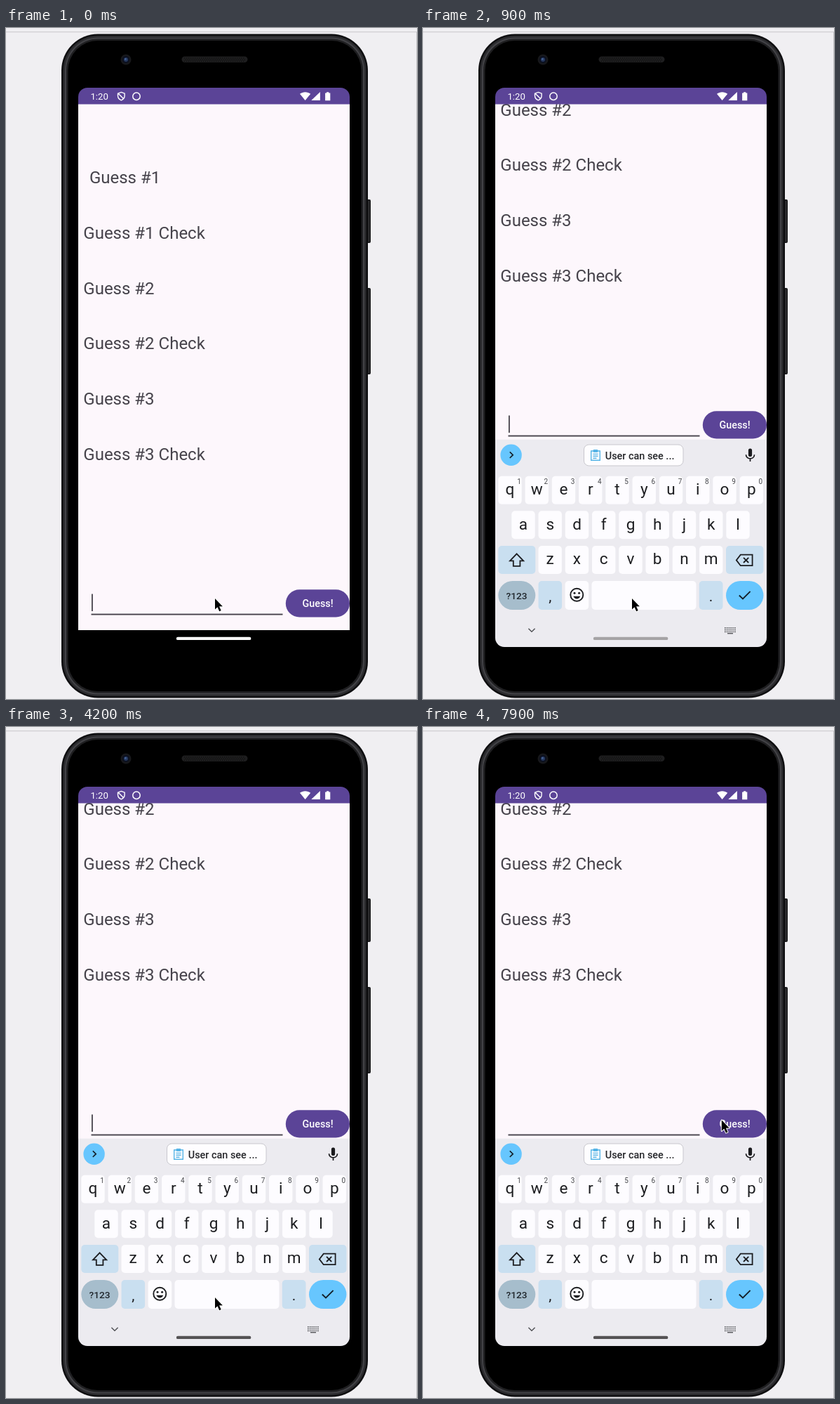
These frames come from a looping animation (586x955 px, 8000 ms). An HTML page with a canvas:

```html
<!DOCTYPE html>
<html lang="en">
<head>
<meta charset="utf-8">
<title>Guessing game</title>
<style>
html, body { margin: 0; width: 100%; height: 100%; overflow: hidden; background: #f0eff2; }
canvas { display: block; width: 586px; height: 955px; }
</style>
</head>
<body>
<canvas id="stage"></canvas>
<script>
const W = 586, H = 955, LOOP = 8000;
const PURPLE = '#5b4497', INK = '#46434b', KEY = '#fdfcff', TINT = '#c9dff0', SKY = '#67c6fe', PANEL = '#ecebf0';
const canvas = document.getElementById('stage');
const dpr = window.devicePixelRatio || 1;
canvas.width = W * dpr;
canvas.height = H * dpr;
const c = canvas.getContext('2d');

const clamp = v => Math.max(0, Math.min(1, v));
const span = (t, a, b) => clamp((t - a) / (b - a));
const lerp = (a, b, k) => a + (b - a) * k;
const easeOut = k => 1 - (1 - k) ** 3;
const easeInOut = k => k * k * (3 - 2 * k);

function box(x, y, w, h, r, fill, stroke, lw = 1) {
  c.beginPath();
  c.roundRect(x, y, w, h, r);
  if (fill) { c.fillStyle = fill; c.fill(); }
  if (stroke) { c.strokeStyle = stroke; c.lineWidth = lw; c.stroke(); }
}

function disc(x, y, r, fill) {
  c.beginPath();
  c.arc(x, y, r, 0, Math.PI * 2);
  c.fillStyle = fill;
  c.fill();
}

function ring(x, y, r, color, lw) {
  c.beginPath();
  c.arc(x, y, r, 0, Math.PI * 2);
  c.strokeStyle = color;
  c.lineWidth = lw;
  c.stroke();
}

function path(d, x, y, color, lw) {
  const p = new Path2D(d);
  c.save();
  c.translate(x, y);
  if (lw) { c.strokeStyle = color; c.lineWidth = lw; c.stroke(p); }
  else { c.fillStyle = color; c.fill(p); }
  c.restore();
}

function text(s, x, y, size, color, { weight = 400, align = 'left' } = {}) {
  c.font = `${weight} ${size}px Roboto, sans-serif`;
  c.textAlign = align;
  c.fillStyle = color;
  c.fillText(s, x, y);
  return c.measureText(s).width;
}

// Values that hold from the given time on
const typed = [[0, ''], [3000, 'j'], [4000, ''], [5400, 'k'], [5600, 'ki'], [5800, 'kit'], [6000, 'kite'], [7300, '']];
const blinkStarts = [-150, 850, ...typed.slice(1).map(e => e[0])];

function caretOn(t) {
  const start = Math.max(...blinkStarts.filter(s => s <= t));
  return (t - start) % 1000 < 500;
}

function drawPhone() {
  c.fillStyle = '#f0eff2';
  c.fillRect(0, 0, W, H);
  c.fillStyle = '#cfced1';
  c.fillRect(0, 5, W, 1.2);
  c.fillStyle = '#c6c5c8';
  c.fillRect(585, 6, 1, H);

  box(513, 244, 7, 62, 2, '#1b1b1d');
  box(513, 370, 7, 123, 2, '#1b1b1d');
  box(517, 246, 1, 58, 0, '#3c3c3f');
  box(517, 372, 1, 119, 0, '#3c3c3f');
  const rim = [[0, '#0e0e10'], [2.5, '#2b2b2e'], [5, '#424246'], [7, '#1f1f21'], [9.5, '#000']];
  for (const [d, color] of rim) box(79 + d, 8.5 + d, 437 - 2 * d, 945 - 2 * d, 52 - d, color);

  disc(171, 45, 7.5, '#17181b');
  disc(171, 45, 5, '#0b1020');
  disc(171, 45, 3, '#26395f');
  disc(170.4, 44.2, 1.2, '#4a679b');
  box(250.5, 40.5, 94, 8.5, 4.2, '#1e1e1f');
  c.fillStyle = '#0c0c0c';
  for (let y = 0; y < 3; y++)
    for (let x = 0; x < 29; x++) c.fillRect(254 + x * 3 + (y % 2) * 1.5, 42.3 + y * 2.2, 1.2, 1.2);
}

function drawStatus() {
  c.fillStyle = PURPLE;
  c.fillRect(103, 85, 387, 23.5);
  text('1:20', 120.4, 102, 13.2, '#fff');
  path('M0-5.6 L4.8-3.8 V-.4 C4.8 2.6 2.6 4.8 0 5.8 C-2.6 4.8 -4.8 2.6 -4.8-.4 V-3.8Z M-4.4-4 L3.6 4', 164.3, 97, '#fff', 1.4);
  ring(186, 97.2, 5.2, '#fff', 1.5);
  path('M0 6 L-7.6-3.2 C-3.4-6.7 3.4-6.7 7.6-3.2Z', 426.6, 97, '#fff');
  path('M6.3-6 V6 H-6.3Z', 441.6, 97, '#fff');
  path('M-1.6-6 H1.6 V-4.7 H3.6 V6 H-3.6 V-4.7 H-1.6Z', 458.7, 97.2, '#fff');
}

function drawApp(t) {
  const pan = -254 * easeOut(span(t, 100, 367));
  c.save();
  c.beginPath();
  c.rect(103, 108, 387, 749);
  c.clip();
  c.translate(0, pan);
  c.fillStyle = '#fdf7fc';
  c.fillRect(103, 108, 387, 749);
  for (let i = 0; i < 6; i++) {
    const label = `Guess #${(i >> 1) + 1}` + (i % 2 ? ' Check' : '');
    text(label, i ? 110.3 : 118.9, 220.9 + i * 78.8, 24, INK);
  }

  const word = typed.filter(e => e[0] <= t).pop()[1];
  const width = word ? text(word, 121.5, 824.4, 18.1, '#1d1b20') : 0;
  c.fillStyle = '#1d1b20';
  if (width) c.fillRect(121.5, 826, width, 1);
  c.fillStyle = INK;
  c.fillRect(121.5, 833.6, 273, 1.9);
  if (caretOn(t)) c.fillRect(122 + width, 805.5, 1.8, 24.5);

  box(398.8, 799.3, 91.2, 39.2, 19.6, PURPLE);
  text('Guess!', 444.6, 824.3, 14.3, '#fff', { weight: 500, align: 'center' });
  c.restore();
}

function drawRow(letters, x, y) {
  [...letters].forEach((ch, i) => {
    const cx = x + i * 38.25;
    box(cx - 16.7, y, 33.4, 40, 5, KEY);
    text(ch, cx, y + 26.3, 22.6, '#1c1d20', { align: 'center' });
    if (letters.length === 10) text((i + 1) % 10, cx + 13, y + 11, 10, '#45464a', { align: 'center' });
  });
}

function drawKeyboard(t) {
  const slide = 296 * (1 - easeOut(span(t, 160, 468)));
  if (slide >= 296) return;
  c.save();
  c.translate(0, slide);
  c.fillStyle = PANEL;
  c.fillRect(103, 585.7, 387, 296);

  disc(125.6, 607.7, 15.2, SKY);
  path('M-2.2-4.3 L2.2 0 L-2.2 4.3', 126, 607.7, '#15202a', 1.7);
  box(229.5, 593, 141.5, 30, 7, '#fefdff', '#c8c7cd');
  path('M-6.3-6 H6.3 V7.3 H-6.3Z M-3.6-1.6 H3.6 M-3.6 1.3 H3.6 M-3.6 4.2 H1.5', 246, 608, '#55b4e6', 1.4);
  box(242.6, 600, 6.8, 4, 1, '#55b4e6');
  text('User can see ...', 259.8, 613.6, 14.4, '#25262a', { weight: 500 });
  box(463.9, 598.5, 5.2, 11.5, 2.6, '#1b1b1e');
  path('M-6-1.4 C-6 6 6 6 6-1.4 M0 4.4 V8.5', 466.5, 608.6, '#1b1b1e', 1.7);

  drawRow('qwertyuiop', 124, 637.7);
  drawRow('asdfghjkl', 143, 687.2);
  drawRow('zxcvbnm', 181.2, 737);

  box(107.3, 737, 53, 40, 5, TINT);
  path('M0-9 L9.6 1 H4.8 V8.6 H-4.8 V1 H-9.6Z', 133.6, 757.3, '#1c1d20', 1.8);
  box(432, 737, 53.5, 40, 5, TINT);
  path('M-5.4-7.8 H11.4 V7.8 H-5.4 L-11.4 0Z M-1.2-3.6 L6 3.6 M6-3.6 L-1.2 3.6', 458.2, 757.4, '#1c1d20', 1.8);

  box(107.3, 787, 53, 41, 20.5, '#a6bdcc');
  text('?123', 133.6, 812.5, 13.7, '#20272d', { weight: 500, align: 'center' });
  box(164.5, 787, 33.6, 41, 5, TINT);
  text(',', 181.3, 815.5, 21, '#1c1d20', { align: 'center' });
  box(202.6, 787, 33.6, 41, 5, KEY);
  ring(219.3, 806.8, 9, '#1c1d20', 1.9);
  disc(216, 804.2, 1.5, '#1c1d20');
  disc(222.6, 804.2, 1.5, '#1c1d20');
  path('M-5 1.8 C-3.2 6.6 3.2 6.6 5 1.8Z', 219.3, 807, '#1c1d20');
  box(240.5, 787, 149, 41, 5, KEY);
  box(393.7, 787, 33.8, 41, 5, TINT);
  text('.', 410.6, 815.5, 21, '#1c1d20', { align: 'center' });
  box(432, 787, 53.5, 41, 20.5, SKY);
  path('M-7.8.2 L-2.6 5.2 L8-5.4', 458.6, 807.3, '#14202a', 1.9);

  path('M-4.6-2.3 L0 2.3 L4.6-2.3', 155, 857, '#55565a', 1.5);
  c.fillStyle = '#55565a';
  for (let y = 0; y < 3; y++)
    for (let x = 0; x < 6; x++) c.fillRect(430 + x * 2.8, 853 + y * 2.8, 1.6, 1.6);
  c.fillRect(434, 861, 8, 1.4);
  c.restore();
}

function drawPill(t) {
  if (t >= 200 && t < 700) return;
  const k = span(t, 700, 1130);
  const v = Math.round(lerp(236, 84, k));
  box(242.8, 866.7, 106.6, 4.4, 2.2, t < 200 ? '#fff' : `rgb(${v},${v - 2},${v})`);
}

function drawPointer(t) {
  const a = easeInOut(span(t, 5900, 6250)), b = easeInOut(span(t, 6750, 7150));
  const x = lerp(lerp(298, 426.8, a), 425.8, b);
  const y = lerp(lerp(812, 702.5, a), 559.5, b);
  const arrow = 'M0 0 V15.4 L3.5 12.2 L6.2 18.2 L8.7 17.1 L6.1 11.3 H10.9Z';
  c.lineJoin = 'round';
  path(arrow, x, y, '#fff', 2);
  path(arrow, x, y, '#000');
  c.lineJoin = 'miter';
}

function draw(t) {
  c.setTransform(dpr, 0, 0, dpr, 0, 0);
  drawPhone();
  c.save();
  c.beginPath();
  c.roundRect(103, 85, 387, 796, 13);
  c.clip();
  c.fillStyle = '#000';
  c.fillRect(103, 85, 387, 796);
  drawApp(t);
  drawStatus();
  drawKeyboard(t);
  drawPill(t);
  c.restore();
  drawPointer(t);
}

const begin = performance.now();
function tick() {
  draw((performance.now() - begin) % LOOP);
  requestAnimationFrame(tick);
}
tick();
</script>
</body>
</html>
```
